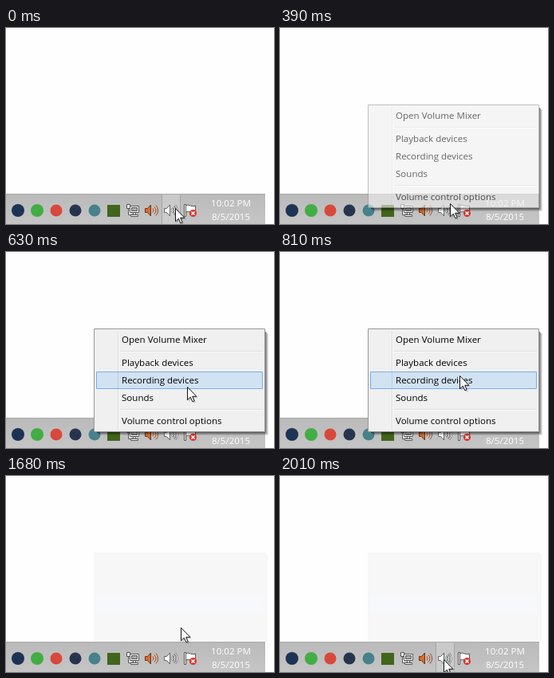
An HTML page for the animation above (2040 ms loop, 336 by 246 pixels).

```html
<!DOCTYPE html>
<html>
<head>
<meta charset="utf-8">
<style>
html, body { margin: 0; width: 100%; height: 100%; overflow: hidden; background: #fefefe; }
svg { display: block; }
text { font: 11.55px "Open Sans", "Noto Sans", sans-serif; }
</style>
</head>
<body>
<svg width="336" height="246" viewBox="0 0 336 246">
  <defs>
    <linearGradient id="bar" x2="0" y2="1">
      <stop stop-color="#bababa"/><stop offset="1" stop-color="#c5c5c5"/>
    </linearGradient>
    <path id="cone" d="M-7.5-2.5h3l4-4.5V7l-4-4.5h-3z"/>
    <path id="waves" d="M2-2.5q2 2.5 0 5M4-4.5q4 4.5 0 9M6-6.5q5.500 6.500 0 13" fill="none"/>
  </defs>

  <g id="ghost">
    <path d="M110 96H325L328 100V208H110z" fill="#f7f7f7"/>
    <path d="M113 150h209v22h-209z" fill="#f6f8fb"/>
  </g>

  <path d="M0 208h325v38H0z" fill="url(#bar)"/>
  <path d="M0 208.500h325" stroke="#a9a9a9"/>
  <g id="hover">
    <path d="M196 209h22v37h-22z" fill="#d0d0d0" opacity=".7"/>
    <path d="M195.500 209v37M218.500 209v37" stroke="#a6a6a6"/>
  </g>

  <circle cx="15" cy="229" r="8" fill="#1d3354"/>
  <circle cx="39" cy="229" r="8" fill="#42ad45"/>
  <circle cx="63" cy="229" r="7.500" fill="#d9483b"/>
  <circle cx="87" cy="229" r="7.500" fill="#26354d"/>
  <circle cx="111" cy="229" r="7.500" fill="#47818c"/>
  <path d="M127 222h16v15h-16z" fill="#41651a"/>

  <g fill="#fff" stroke="#555" transform="translate(159 229)">
    <path d="M-3.500-5.500h11v8h-11zM.500 2.500h3v3h-3zM-2.500 5.500h9v2h-9z"/>
    <path d="M-1.500-3.500h7v4h-7z" fill="#aaa"/>
    <path d="M-7.500-7.500h4v5h-4zM-5.500-2.500v8h3" fill="#eee"/>
  </g>
  <g stroke="#6b3219" transform="translate(182 229)">
    <use href="#cone" fill="#d96b2b"/><use href="#waves" stroke="#a34c20"/>
  </g>
  <g stroke="#666" transform="translate(206 229)">
    <use href="#cone" fill="#fff"/>
    <use href="#waves" stroke-width="2.200"/><use href="#waves" stroke="#fff"/>
  </g>
  <g transform="translate(231 229)">
    <path d="M-7.500-7.500h2v15h-2zM-5.500-6.500q3-1 6 .5t6 0v8q-3 1-6 0t-6 0z" fill="#fff" stroke="#555"/>
    <circle cx="3.500" cy="3.500" r="4.500" fill="#d9332b"/>
    <path d="M1.500 1.500l4 4m0-4l-4 4" stroke="#fff" stroke-width="1.500"/>
  </g>
  <g fill="#fff" text-anchor="middle">
    <text x="282" y="224">10:02 PM</text><text x="282" y="241">8/5/2015</text>
  </g>

  <g id="shadow" fill="none" stroke="#000"></g>
  <g id="menu">
    <path d="M110.500 96.500h214v129h-214z" fill="#f0f0f0" stroke="#979797"/>
    <path d="M140.500 99v124M143 124.500h179M143 197.500h179" stroke="#dedede"/>
    <path d="M141.500 99v124M143 125.500h179M143 198.500h179" stroke="#fafafa"/>
    <g id="items"></g>
  </g>
  <g id="pick">
    <path d="M113.500-10.500h208v21h-208z" fill="#d1e2f2" stroke="#78aee5"/>
    <path d="M140.500-10v20" stroke="#bdd0e2"/>
    <text id="label" x="145" y="4"></text>
  </g>

  <g id="cursor">
    <path d="M2 2v17l4-4 3 6 2-1-2.500-6H14z" opacity=".15"/>
    <path d="M.5.500v16.300l3.800-3.600 2.600 5.700 2.300-1-2.500-5.600h5.200z" fill="#fff" stroke="#111"/>
  </g>
</svg>
<script>
const LOOP = 2040, STEP = 30;
const $ = id => document.getElementById(id);
const items = [['Open Volume Mixer', 110], ['Playback devices', 139],
  ['Recording devices', 161], ['Sounds', 183], ['Volume control options', 212]];
const SOUNDS = 3, RECORDING = 2;

// time, x, y of the pointer tip
const path = [[0, 212, 226], [330, 211, 226], [390, 213, 220], [450, 219, 203],
  [510, 224, 187], [600, 227, 173], [690, 227, 162], [810, 225, 155],
  [1440, 225, 155], [1560, 224, 167], [1680, 219, 190], [1800, 206, 211],
  [1950, 195, 225], [1980, 199, 229], [2010, 205, 230], [LOOP, 205, 230]];

items.forEach(([name, y]) =>
  $('items').innerHTML += `<text x="145" y="${y + 4}">${name}</text>`);
for (let k = 0; k < 4; k++)
  $('shadow').innerHTML +=
    `<path d="M${325.5 + k} ${100 + k}V${226.5 + k}H${114 + k}" opacity="${0.5 - k * 0.13}"/>`;

const clamp = v => Math.max(0, Math.min(1, v));
const fade = (id, v) => $(id).style.opacity = clamp(v);

function pointer(t) {
  const i = path.findIndex(p => p[0] > t);
  const [t0, x0, y0] = path[i - 1], [t1, x1, y1] = path[i];
  const k = (t - t0) / (t1 - t0);
  return [x0 + (x1 - x0) * k, y0 + (y1 - y0) * k].map(Math.round);
}

function draw(now) {
  const t = Math.floor(now % LOOP / STEP) * STEP;
  const [x, y] = pointer(t);
  const open = t >= 330 && t < 1440;
  $('cursor').setAttribute('transform', `translate(${x} ${y})`);
  fade('ghost', t >= 1440);
  fade('hover', t < 330 ? 1 : (t - 1800) / 210);
  fade('shadow', open);
  fade('menu', open ? (t - 300) / 150 : 0);

  const [name, mid] = items[t < 1440 && y > 172 ? SOUNDS : RECORDING];
  $('pick').setAttribute('transform', `translate(0 ${mid})`);
  $('label').textContent = name;
  fade('pick', open ? t > 510 : t >= 1440 ? 1 - (t - 1410) / 210 : 0);
  requestAnimationFrame(draw);
}
requestAnimationFrame(draw);
</script>
</body>
</html>
```
